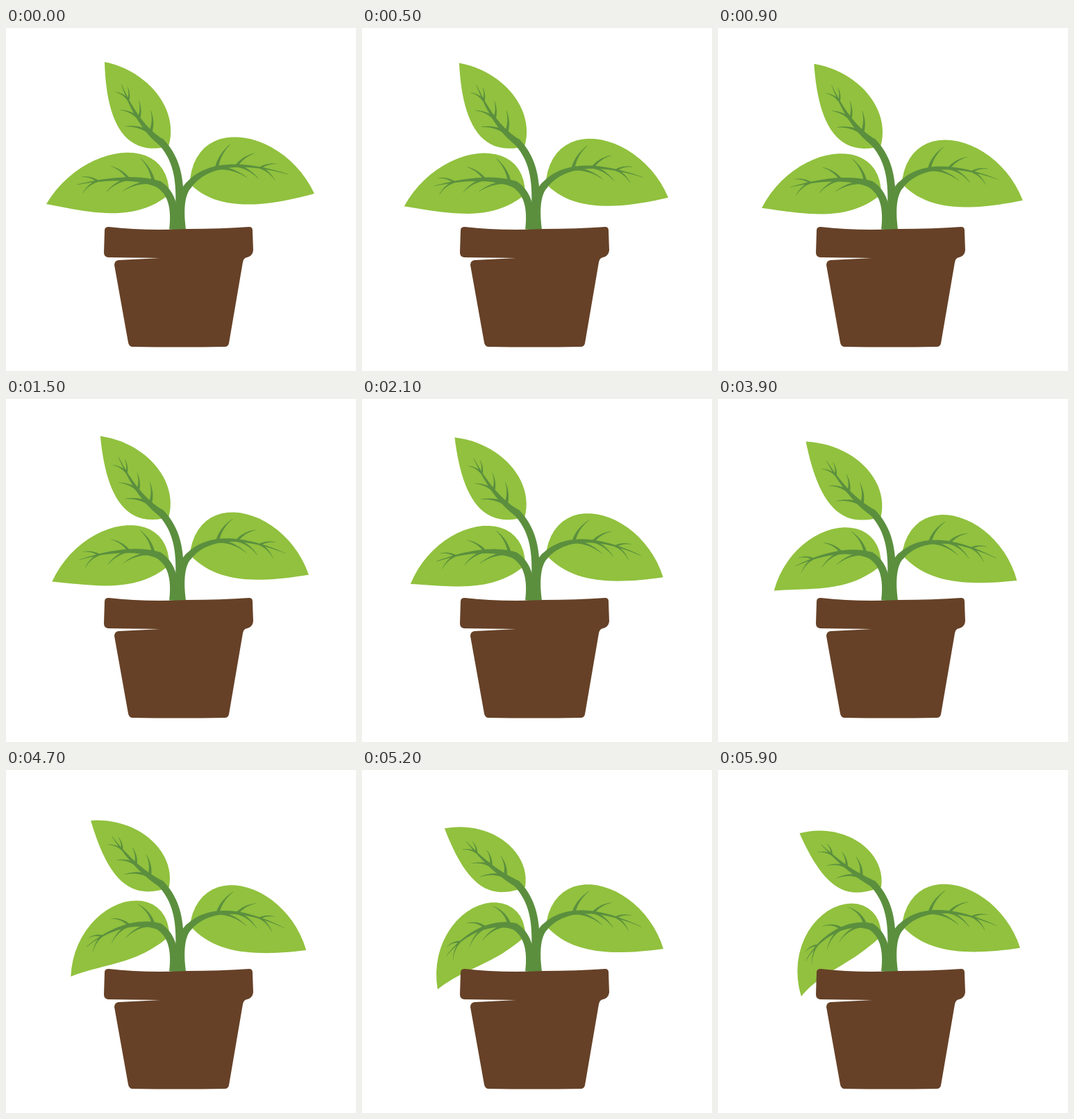
An HTML page with a canvas for the animation above (6000 ms loop, 504 by 495 pixels).

```html
<!DOCTYPE html>
<html lang="en">
<head>
<meta charset="utf-8">
<title>Potted plant</title>
<style>
  html, body { margin: 0; width: 100%; height: 100%; overflow: hidden; background: #fff; }
  canvas { display: block; }
</style>
</head>
<body>
<canvas id="stage" width="504" height="495"></canvas>
<script>
const ctx = document.getElementById('stage').getContext('2d');
const LOOP = 6000, STEP = 100, SETTLE = 3900, CURL = 1900;
const LEAF = '#91c13e', STEM = '#5b8f3e', POT = '#664127';

const pot = new Path2D(`M148,287 Q200,293 260,290 Q310,290 350,287 Q355,287 355,292
  L356,321 Q355,329 347,331 Q342,332 341,338 L321,455 Q320,460 315,460
  Q250,461 181,460 Q177,459 176,454 L156,342 Q156,336 162,335 L222,332
  L147,331 Q141,330 141,324 L142,292 Q142,287 148,287Z`);

// front/back: curves tip to base and base to tip; limb and rib: stalk and midrib.
// turn and shrink: bend of the tip once settled and once curled.
const leaves = [
  {
    front: [[58, 254], [110, 166], [235, 150], [235, 240]],
    back: [[235, 240], [185, 282], [120, 266], [58, 254]],
    limb: [[241, 291], [244, 262], [240, 238], [219, 225]],
    rib: [[221, 226], [180, 210], [102, 226]],
    pivot: [225, 229], turn: [-.17, -.6], shrink: [.1, .15], stiffness: .8,
    side: 1, firstTwig: .1, twig: 40, ease: k => k
  },
  {
    front: [[444, 239], [402, 148], [277, 122], [265, 218]],
    back: [[265, 225], [305, 265], [370, 259], [444, 239]],
    limb: [[253, 291], [249, 258], [253, 236], [264, 226]],
    rib: [[262, 228], [300, 180], [406, 211]],
    pivot: [260, 232], turn: [.136, .103], shrink: [.06, .04], stiffness: .3,
    side: -1, firstTwig: .4, twig: 40, ease: k => k * (2 - k)
  },
  {
    front: [[142, 49], [205, 62], [250, 118], [234, 171]],
    back: [[234, 171], [165, 188], [144, 125], [142, 49]],
    limb: [[248, 291], [252, 235], [253, 195], [222, 163]],
    rib: [[224, 165], [190, 142], [166, 81]],
    pivot: [222, 163], turn: [-.143, -.358], shrink: [0, .09], stiffness: .3,
    side: 1, firstTwig: .25, twig: 32, ease: k => k
  }
];

const mix = (a, b, k) => a + (b - a) * k;
const same = p => p;
const polar = ([x, y], angle, r) => [x + r * Math.cos(angle), y + r * Math.sin(angle)];

// Point on a Bezier curve of any degree
function along(points, u) {
  while (points.length > 1) {
    points = points.slice(1).map((p, i) => p.map((v, j) => mix(points[i][j], v, u)));
  }
  return points[0];
}

const sample = (points, n = 24) =>
  Array.from({ length: n + 1 }, (_, i) => along(points, i / n));

const heading = (points, u) => {
  const a = along(points, u - .01), b = along(points, u + .01);
  return Math.atan2(b[1] - a[1], b[0] - a[0]);
};

function fillShape(points, colour) {
  ctx.fillStyle = colour;
  ctx.beginPath();
  points.forEach(p => ctx.lineTo(...p));
  ctx.closePath();
  ctx.fill();
}

// Tapered stroke along a curve
function ribbon(spine, startWidth, endWidth, warp) {
  const edge = side => sample(spine).map((p, i, all) => {
    const u = i / (all.length - 1);
    const r = side * mix(startWidth, endWidth, u) / 2;
    return warp(polar(p, heading(spine, u) + Math.PI / 2, r));
  });
  fillShape([...edge(1), ...edge(-1).reverse()], STEM);
}

function poseAt(t, [settled, curled], ease) {
  if (t < SETTLE) return settled * ease(t / SETTLE);
  const k = Math.min(1, (t - SETTLE) / CURL);
  return mix(settled, curled, k * k * (3 - 2 * k));
}

// Bends a leaf round its pivot, more strongly towards the tip
function bender({ front, pivot: [px, py], turn, shrink, stiffness, ease }, t) {
  const reach = Math.hypot(front[0][0] - px, front[0][1] - py);
  const angle = poseAt(t, turn, ease), loss = poseAt(t, shrink, ease);
  return ([x, y]) => {
    const dx = x - px, dy = y - py, d = Math.hypot(dx, dy);
    const bend = angle * (d / reach) ** stiffness;
    return polar([px, py], Math.atan2(dy, dx) + bend, d * (1 - loss * d / reach));
  };
}

function drawTwigs({ rib, side, firstTwig, twig }, warp) {
  for (let i = 0; i < 3; i++) {
    const u = mix(firstTwig, .8, i / 2);
    const base = along(rib, u), ahead = heading(rib, u);
    for (const face of [1, -1]) {
      const length = twig * (1 - .2 * i) * (face > 0 ? 1 : 1.15);
      const angle = ahead + side * (face > 0 ? .8 - .2 * i : -.55);
      const knee = polar(base, angle + side * .35, length * .5);
      ribbon([base, knee, polar(base, angle, length)], 5 - i, .4, warp);
    }
  }
}

function drawLeaf(leaf, t) {
  const warp = bender(leaf, t);
  fillShape([...sample(leaf.front), ...sample(leaf.back)].map(warp), LEAF);
  drawTwigs(leaf, warp);
  ribbon(leaf.rib, 10, .5, warp);
}

function frame() {
  const t = Math.floor(performance.now() % LOOP / STEP) * STEP;
  ctx.fillStyle = '#fff';
  ctx.fillRect(0, 0, 504, 495);
  leaves.forEach(leaf => drawLeaf(leaf, t));
  leaves.forEach(leaf => ribbon(leaf.limb, 12, 10, same));
  ctx.fillStyle = POT;
  ctx.fill(pot);
  requestAnimationFrame(frame);
}
frame();
</script>
</body>
</html>
```
